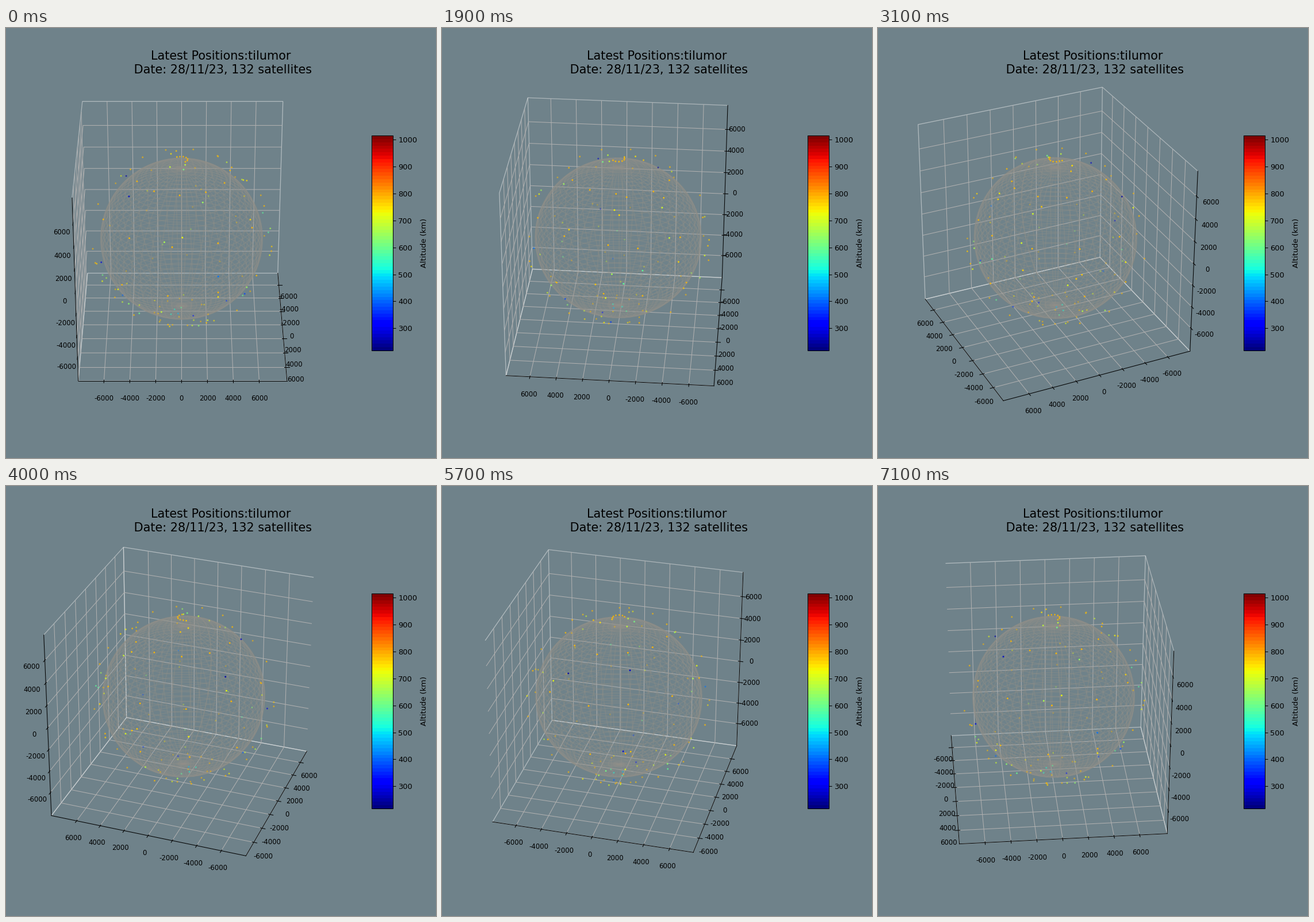
Write a matplotlib script that moves like this. It is 748 px wide and 748 px high and loops after 7.2 s.

```python
import numpy as np
import matplotlib.pyplot as plt
from matplotlib.animation import FuncAnimation

SIZE, DPI = 748, 93.5
FRAMES, INTERVAL = 72, 100
EARTH = 6371
BACKDROP = "xkcd:steel grey"

# Middle and half range of the x, y and z axes in km
MIDDLE = np.array([-33, 84, 0])
REACH = np.array([7847, 8070, 8190])

# Constellation: near-polar planes with evenly spaced slots plus strays
PLANES, SLOTS = 6, 11
TILT = np.radians(86.4)
FIRST_NODE, NODE_STEP = -71, 31.5
FIRST_ARC = 58.5
CRUISE = 778


def on_orbit(node, arc, km):
    """Position in km at an angle along an orbit with the given node."""
    node, arc = np.radians([node, arc])
    a, b = np.cos(arc), np.sin(arc) * np.cos(TILT)
    unit = np.array([np.cos(node) * a - np.sin(node) * b,
                     np.sin(node) * a + np.cos(node) * b,
                     np.sin(arc) * np.sin(TILT)])
    return unit * (EARTH + km)


def constellation(rng):
    points, heights = [], []
    for plane in range(PLANES):
        node = FIRST_NODE + NODE_STEP * plane
        for slot in range(SLOTS):
            arc = FIRST_ARC + 360 * slot / SLOTS
            stray_km = max(CRUISE - rng.exponential(130), 220)
            points += [on_orbit(node, arc, CRUISE),
                       on_orbit(node + rng.normal(0, 6), rng.uniform(0, 360),
                                stray_km)]
            heights += [CRUISE, stray_km]
    return np.array(points), heights


plt.rcParams["axes.unicode_minus"] = False
fig = plt.figure(figsize=(SIZE / DPI, SIZE / DPI), dpi=DPI, facecolor=BACKDROP)
ax = fig.add_axes([0, 0.1, 0.8, 0.8], projection="3d", computed_zorder=False)
ax.set_facecolor("none")
ax.set_box_aspect((1, 1, 1))

u, v = np.meshgrid(np.linspace(0, 2 * np.pi, 50), np.linspace(0, np.pi, 50))
ax.plot_wireframe(EARTH * np.cos(u) * np.sin(v), EARTH * np.sin(u) * np.sin(v),
                  EARTH * np.cos(v), color="#929088", alpha=0.3,
                  linewidth=1.5, zorder=1)

points, heights = constellation(np.random.default_rng(4))
dots = ax.scatter(*points.T, c=heights, cmap=plt.get_cmap("jet", 64),
                  vmin=218, vmax=1014, s=5, linewidths=0, zorder=2)

lows, highs = MIDDLE - REACH, MIDDLE + REACH
ax.set(xlim=(lows[0], highs[0]), ylim=(lows[1], highs[1]),
       zlim=(lows[2], highs[2]))
for axis in (ax.xaxis, ax.yaxis, ax.zaxis):
    axis.set_ticks(range(-6000, 6001, 2000))
    axis.set_tick_params(labelsize=9)
    axis.pane.fill = False

fig.colorbar(dots, cax=fig.add_axes([0.85, 0.25, 0.05, 0.5]),
             label="Altitude (km)", ticks=range(300, 1001, 100))
fig.suptitle("Latest Positions:tilumor\n"
             f" Date: 28/11/23, {len(points)} satellites",
             y=0.948, fontsize=16, linespacing=1.26)


def update(i):
    ax.view_init(elev=30, azim=i * 360 / FRAMES)
    return []


anim = FuncAnimation(fig, update, frames=FRAMES, interval=INTERVAL,
                     repeat=True, repeat_delay=0)
plt.show()
```
